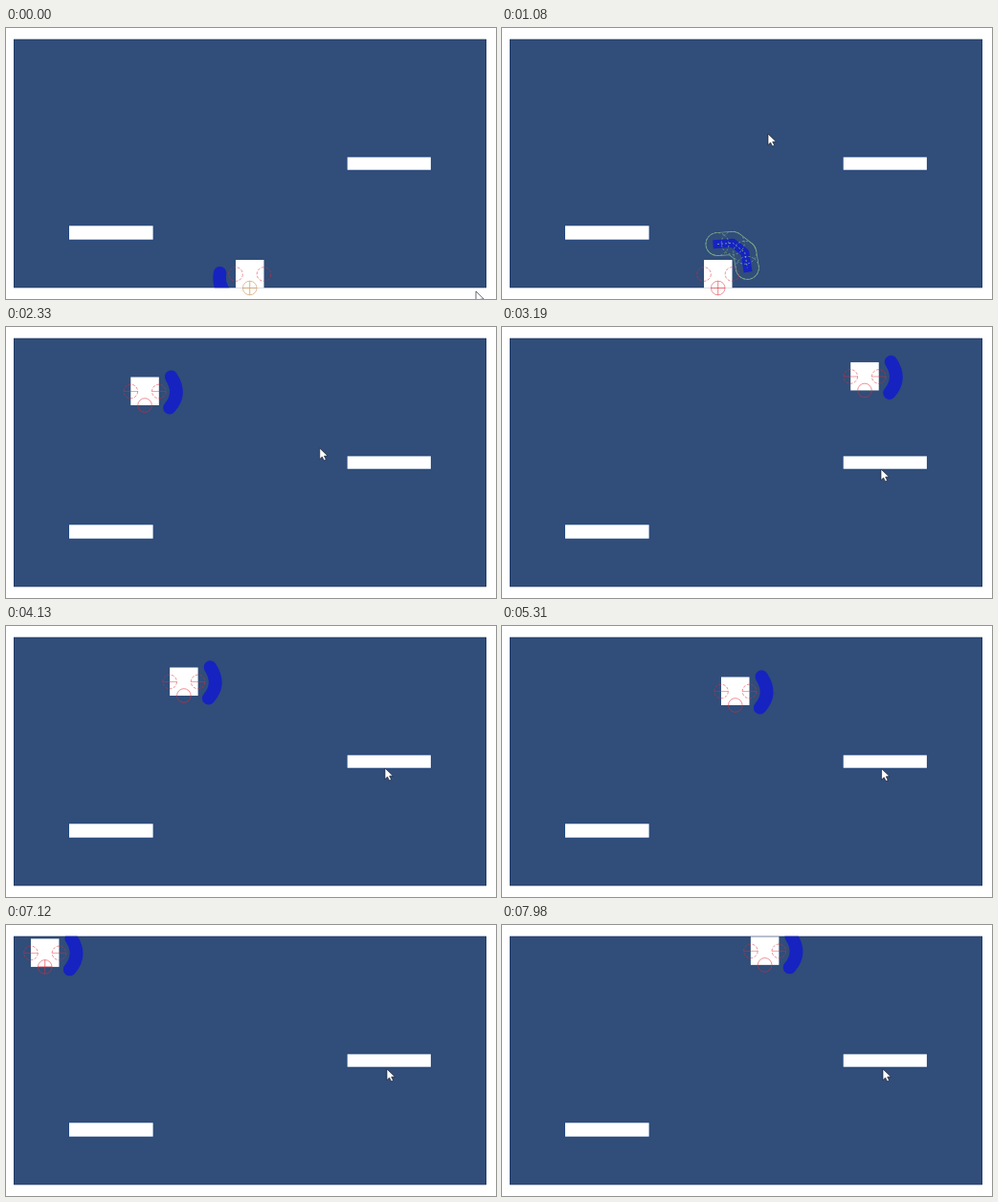
An HTML page with a canvas for the animation above (8000 ms loop, 512 by 284 pixels).

```html
<!DOCTYPE html>
<html lang="en">
<head>
<meta charset="utf-8">
<title>Platform hop</title>
<style>
  html, body { margin: 0; width: 100%; height: 100%; overflow: hidden; background: #fff; }
  canvas { display: block; width: 512px; height: 284px; }
</style>
</head>
<body>
<canvas id="stage" width="512" height="284"></canvas>
<script>
const ctx = document.getElementById('stage').getContext('2d');
const LOOP = 8000;
const STAGE = { x: 8, y: 11.7, w: 494, h: 260.6 };
const SIZE = 29.5, GROUND = 243, CEILING = 12.3;
const SPEED = 0.272, GRAVITY = 0.0007, JUMP = 0.55;
const SWING = { start: 800, length: 376, from: 150, to: 362 };
const BLUE = '#1623c0', NAVY = '#314d79', GREEN = '#7fae8c', TAN = '#d0a06c';
const RED = 'rgba(225,45,55,.75)';

// [start, goal x]: the hero walks at constant speed until it arrives or is redirected.
const walks = [[870, 211], [1350, 111], [2260, 397], [3306, 163], [4157, 229], [6135, 8], [7055, 400]];
// [first jump, count, interval]
const bursts = [[1275, 1, 0], [2390, 3, 453], [3744, 4, 386], [5740, 1, 0], [6695, 5, 310]];
const jumps = bursts.flatMap(([first, count, gap]) =>
  Array.from({ length: count }, (_, i) => first + i * gap));
// [start, duration, x, y]
const glides = [[70, 300, 357, 137], [600, 400, 278, 111], [2196, 320, 396, 149], [4750, 1800, 398, 151]];

const progress = (t, start, length) => Math.min(1, Math.max(0, (t - start) / length));
const mix = (a, b, p) => a + (b - a) * p;

function heroX(t) {
  let x = 240;
  walks.forEach(([start, goal], i) => {
    const end = Math.min(t, i + 1 < walks.length ? walks[i + 1][0] : LOOP);
    const reach = SPEED * Math.max(0, end - start);
    x += Math.sign(goal - x) * Math.min(reach, Math.abs(goal - x));
  });
  return x;
}

// Height after a jump; bumping the ceiling cancels the upward speed.
function flight(y0, dt) {
  const room = JUMP * JUMP - 2 * GRAVITY * (y0 - CEILING);
  const bump = room > 0 ? (JUMP - Math.sqrt(room)) / GRAVITY : Infinity;
  return dt > bump
    ? CEILING + GRAVITY / 2 * (dt - bump) ** 2
    : y0 - JUMP * dt + GRAVITY / 2 * dt * dt;
}

function heroY(t) {
  let y = GROUND;
  for (let i = 0; i < jumps.length && jumps[i] < t; i++) {
    y = flight(y, Math.min(t, jumps[i + 1] ?? LOOP) - jumps[i]);
  }
  return Math.min(y, GROUND);
}

function pointerAt(t) {
  return glides.reduce(([x, y], [start, length, toX, toY]) => {
    const p = progress(t, start, length);
    return [mix(x, toX, p), mix(y, toY, p)];
  }, [491, 276]);
}

function stroke(color, width) {
  ctx.strokeStyle = color;
  ctx.lineWidth = width;
  ctx.stroke();
}

function line(points, color, width) {
  ctx.beginPath();
  points.forEach(([x, y]) => ctx.lineTo(x, y));
  stroke(color, width);
}

function ring(x, y, r, color) {
  ctx.beginPath();
  ctx.arc(x, y, r, 0, Math.PI * 2);
  stroke(color, 0.7);
}

function cross(x, y, r, color) {
  line([[x - r, y], [x + r, y]], color, 0.8);
  line([[x, y - r], [x, y + r]], color, 0.8);
}

function box(x, y, w, h) {
  ctx.fillStyle = '#fff';
  ctx.fillRect(x, y, w, h);
}

function platform(x, y, w, h) {
  ctx.fillStyle = '#234b87';
  ctx.fillRect(x - 0.7, y - 0.7, w + 1.4, h + 1.4);
  box(x, y, w, h);
}

function drawStage() {
  ctx.fillStyle = '#203a68';
  ctx.fillRect(STAGE.x, STAGE.y, STAGE.w, STAGE.h);
  ctx.fillStyle = NAVY;
  ctx.fillRect(STAGE.x + 0.8, STAGE.y + 0.8, STAGE.w - 1.6, STAGE.h - 1.6);
  platform(66, 207.3, 87.6, 14.4);
  platform(356.7, 135.4, 87.2, 13.3);
}

function drawCollider() {
  const arm = [[24, -20], [35, -8], [35, 8], [24, 20]];
  line(arm, GREEN, 24.8);
  line(arm, NAVY, 23.4);
  ctx.lineCap = 'square';
  line(arm, BLUE, 9);
  ctx.lineCap = 'butt';
  ctx.setLineDash([2, 2]);
  line(arm, GREEN, 0.8);
  for (const [x, y] of arm) ring(x, y, 12, GREEN);
}

function drawBlade(cx, cy, t) {
  const p = progress(t, SWING.start, SWING.length);
  ctx.save();
  ctx.beginPath();
  ctx.rect(STAGE.x, STAGE.y, STAGE.w, STAGE.h);
  ctx.clip();
  ctx.translate(cx, cy);
  ctx.rotate(mix(SWING.from, SWING.to, p) * Math.PI / 180);
  ctx.lineJoin = ctx.lineCap = 'round';
  if (p > 0 && p < 1) {
    drawCollider();
  } else {
    ctx.beginPath();
    ctx.moveTo(27, -16);
    ctx.quadraticCurveTo(39, 1, 26.5, 16.5);
    stroke(BLUE, 13.6);
  }
  ctx.restore();
}

function drawSensors(x, y, idle) {
  const r = 7.3, midY = y + 15, midX = x + SIZE / 2, foot = y + SIZE;
  const grounded = y >= GROUND, footColor = idle ? TAN : RED;
  for (const side of [x, x + SIZE]) {
    ctx.setLineDash([3, 1.5]);
    ring(side, midY, r, RED);
    ctx.setLineDash([]);
    if (!grounded) line([[side - r, midY], [side + r, midY]], RED, 0.6);
  }
  ring(midX, foot, r, footColor);
  if (grounded || x < 60) cross(midX, foot, r, footColor);
}

function drawPointer(x, y) {
  ctx.save();
  ctx.translate(x, y);
  ctx.beginPath();
  [[0, 0], [0, 11.5], [2.6, 9], [4.6, 13], [6.6, 12], [4.7, 8.2], [8.3, 8]]
    .forEach(([px, py]) => ctx.lineTo(px, py));
  ctx.closePath();
  ctx.fillStyle = '#fff';
  ctx.fill();
  stroke('rgba(20,25,40,.8)', 0.8);
  ctx.restore();
}

function draw(t) {
  const x = heroX(t), y = heroY(t);
  ctx.clearRect(0, 0, 512, 284);
  drawStage();
  drawBlade(x + SIZE / 2, y + SIZE / 2, t);
  box(x, y, SIZE, SIZE);
  drawSensors(x, y, t < SWING.start);
  drawPointer(...pointerAt(t));
}

function frame() {
  draw(performance.now() % LOOP);
  requestAnimationFrame(frame);
}
frame();
</script>
</body>
</html>
```
